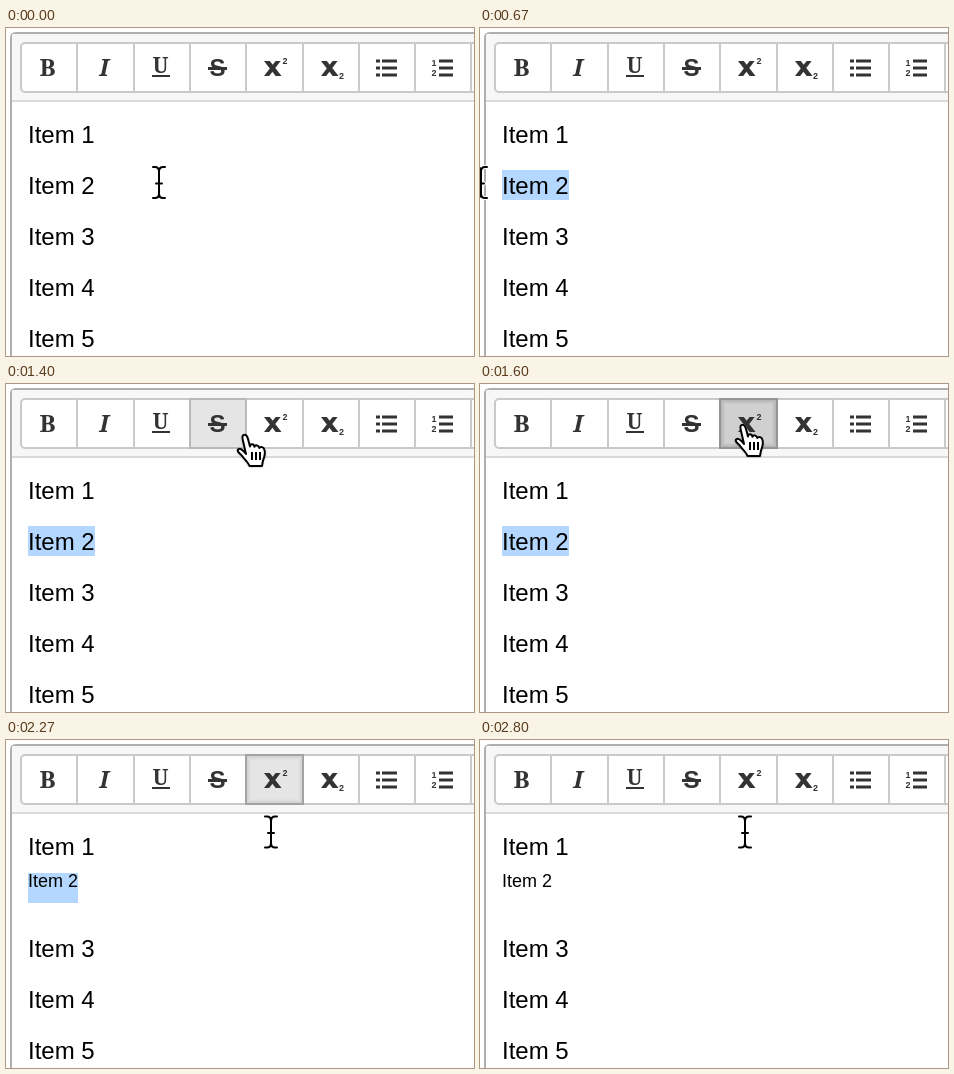
Recreate the animation shown at these times as an HTML page with a canvas. Size 468 by 328 pixels, loop 3.27 s.

```html
<!DOCTYPE html>
<html lang="en">
<head>
<meta charset="utf-8">
<title>Superscript in a text editor</title>
<style>
html, body { margin: 0; width: 100%; height: 100%; overflow: hidden; background: #fff; }
canvas { display: block; }
</style>
</head>
<body>
<canvas id="stage" width="468" height="328"></canvas>
<script>
const ctx = document.getElementById('stage').getContext('2d');
const LOOP = 3270;
const SANS = '"Liberation Sans", Arial, sans-serif';
const SERIF = '"Noto Serif", "Liberation Serif", serif';
const INK = '#333';
const LEFT = 22;
const SUP = 4;

// Pointer path: tick, x, y. One tick is 1/15 s.
const PATH = [
  [0, 153, 154.5], [2, 105, 288], [3, 99, 230], [4, 96, 113], [5, 93, 155],
  [6, 93, 155], [7, 58, 155], [8, 25.5, 155], [10, 1, 154.5], [13, 1, 154.5],
  [16, 119, 120.5], [21, 239, 52], [23, 263, 42], [30, 263, 42], [34, 265, 92]
];

const tickTime = k => Math.round(k * 20 / 3) * 10;

function tickAt(t) {
  const k = Math.floor((t + 5) * 3 / 200);
  return tickTime(k) > t ? k - 1 : k;
}

function pointer(k) {
  const i = PATH.findIndex(p => p[0] >= k);
  if (i < 0) return PATH[PATH.length - 1].slice(1);
  if (i === 0) return PATH[0].slice(1);
  const [k0, x0, y0] = PATH[i - 1], [k1, x1, y1] = PATH[i];
  const u = (k - k0) / (k1 - k0);
  return [x0 + (x1 - x0) * u, y0 + (y1 - y0) * u];
}

function rect(x, y, w, h, color) {
  ctx.fillStyle = color;
  ctx.fillRect(x, y, w, h);
}

function text(str, x, y, font, color = '#000', align = 'left') {
  ctx.font = font;
  ctx.fillStyle = color;
  ctx.textAlign = align;
  ctx.fillText(str, x, y);
}

function poly(...pts) {
  ctx.beginPath();
  for (let i = 0; i < pts.length; i += 2) ctx.lineTo(pts[i], pts[i + 1]);
  ctx.closePath();
  ctx.fill();
}

const edge = i => Math.round(14 + i * 56.3);

function frame() {
  rect(0, 0, 468, 328, '#fff');
  ctx.beginPath();
  ctx.moveTo(5, 340);
  ctx.lineTo(5, 10);
  ctx.quadraticCurveTo(5, 5, 10, 5);
  ctx.lineTo(480, 5);
  ctx.lineTo(480, 340);
  ctx.lineWidth = 2;
  ctx.strokeStyle = '#acb0ae';
  ctx.stroke();
  ctx.save();
  ctx.clip();
  rect(6, 6, 462, 66, '#f7f7f7');
  rect(6, 72, 462, 2, '#dadada');
  ctx.restore();

  ctx.beginPath();
  ctx.roundRect(15, 15, 480, 49, 4);
  ctx.fillStyle = '#fff';
  ctx.fill();
  ctx.strokeStyle = '#c9c9c9';
  ctx.stroke();
  for (let i = 1; i < 9; i++) rect(edge(i), 15, 2, 49, '#cacaca');
}

function highlight(i, fill, border, shade = 0, alpha = 1) {
  const x = edge(i), w = edge(i + 1) - x + 2;
  ctx.save();
  ctx.globalAlpha = alpha;
  rect(x, 14, w, 51, border);
  rect(x + 2, 16, w - 4, 47, fill);
  for (let s = 0; s < 4 && shade; s++) {
    ctx.strokeStyle = `rgba(0,0,0,${shade * (4 - s) / 4})`;
    ctx.lineWidth = 1;
    ctx.strokeRect(x + 2.5 + s, 16.5 + s, w - 5 - 2 * s, 46 - 2 * s);
  }
  ctx.restore();
}

function bigX(x) {
  ctx.fillStyle = INK;
  poly(x, 33, x + 5.8, 33, x + 17.5, 48, x + 11.7, 48);
  poly(x + 11.6, 33, x + 16.6, 33, x + 5.2, 48, x, 48);
}

function icons() {
  const bold = `bold 24px ${SERIF}`;
  text('B', 41.5, 48, bold, INK, 'center');
  text('I', 98, 48, `italic ${bold}`, INK, 'center');
  text('U', 154.5, 45, `bold 21px ${SERIF}`, INK, 'center');
  rect(146, 47, 18, 2, INK);
  text('S', 211.5, 48, `bold 24px ${SANS}`, INK, 'center');
  rect(202, 39, 19, 3, INK);
  bigX(258);
  text('2', 276.5, 36, `bold 9px ${SANS}`, INK);
  bigX(315);
  text('2', 333, 51, `bold 9px ${SANS}`, INK);
  for (let i = 0; i < 3; i++) {
    const y = 31.5 + i * 7;
    rect(370, y, 4, 3, INK);
    rect(376, y, 15, 3, INK);
    rect(433, y, 14, 3, INK);
  }
  text('1', 425.5, 38, `bold 9px ${SANS}`, INK);
  text('2', 425.5, 48, `bold 9px ${SANS}`, INK);
}

function nearestEdge(str, x) {
  ctx.font = `24px ${SANS}`;
  let best = LEFT;
  for (let n = 1; n <= str.length; n++) {
    const e = LEFT + ctx.measureText(str.slice(0, n)).width;
    if (Math.abs(e - x) < Math.abs(best - x)) best = e;
  }
  return best;
}

function items(k, x) {
  const raised = k >= 26;
  if (k >= 7 && k < 35) {
    const from = k < 10 ? nearestEdge('Item 2', x) : LEFT;
    if (raised) rect(LEFT, 133, 50, 30, '#b3d7ff');
    else rect(from, 142, 89 - from, 30, '#b3d7ff');
  }
  for (let n = 1; n <= 5; n++) {
    const small = n === 2 && raised;
    text('Item ' + n, LEFT, small ? 147 : 64 + 51 * n, `${small ? 18 : 24}px ${SANS}`);
  }
  if (k >= 35 && k < 42) rect(22, 92, 2, 30, '#000');
}

function outline(path, inner, outer) {
  ctx.lineCap = ctx.lineJoin = 'round';
  ctx.strokeStyle = '#fff';
  ctx.lineWidth = outer;
  ctx.stroke(path);
  ctx.strokeStyle = '#000';
  ctx.lineWidth = inner;
  ctx.stroke(path);
}

const BEAM = new Path2D(
  'M-6-15.5H-4Q0-15.5 0-11Q0-15.5 4-15.5H6M0-11V11M-6 15.5H-4Q0 15.5 0 11Q0 15.5 4 15.5H6M-3 1H3');
const HAND = new Path2D(
  'M10 21L7 8C6 4 6 2 8.5 1.8C11 1.6 11.5 4 12 6L14 13.5C14 10.5 18 10.5 18.5 13.8' +
  'C19 11.5 23 12 23.3 15C24.5 13 28 14 28.5 17C29.8 21 28.5 24 27 27.5L26 33H13.5' +
  'C12.5 29.5 8.5 26.5 6.5 23.5C4.5 20.5 1 19.5 1.8 16.8C3 14.5 6.5 16 10 21Z');
const ARROW = new Path2D('M0 0V22L5 17.5L9 26L13 24L9.5 16H16Z');

function cursor(x, y) {
  ctx.save();
  if (y > 74) {
    ctx.translate(x, y);
    outline(BEAM, 2, 4);
  } else if (y > 66) {
    ctx.translate(x, y);
    outline(ARROW, 1, 3.5);
    ctx.fillStyle = '#000';
    ctx.fill(ARROW);
  } else {
    ctx.translate(x - 9, y - 3);
    ctx.shadowColor = 'rgba(0,0,0,.3)';
    ctx.shadowBlur = 3;
    ctx.shadowOffsetY = 1;
    ctx.fillStyle = '#fff';
    ctx.fill(HAND);
    ctx.shadowColor = 'transparent';
    outline(HAND, 2, 2);
    for (let i = 0; i < 3; i++) rect(15 + 4 * i, 19, 2, 8, '#000');
  }
  ctx.restore();
}

function buttons(k, x, y) {
  if (k >= 24 && k < 26) highlight(SUP, '#d0d0d0', '#959595', 0.12);
  else if (k >= 26 && k < 37) highlight(SUP, '#e5e5e5', '#a3a3a3', 0.08, k === 36 ? 0.5 : 1);
  else if (y < 66) highlight(Math.floor((x - 14) / 56.3), '#e5e5e5', '#b9b9b9');
}

function draw(t) {
  const k = tickAt(t);
  const [x, y] = pointer(k);
  frame();
  buttons(k, x, y);
  icons();
  items(k, x);
  cursor(x, y);
}

const start = performance.now();
function loop() {
  draw((performance.now() - start) % LOOP);
  requestAnimationFrame(loop);
}
loop();
</script>
</body>
</html>
```
